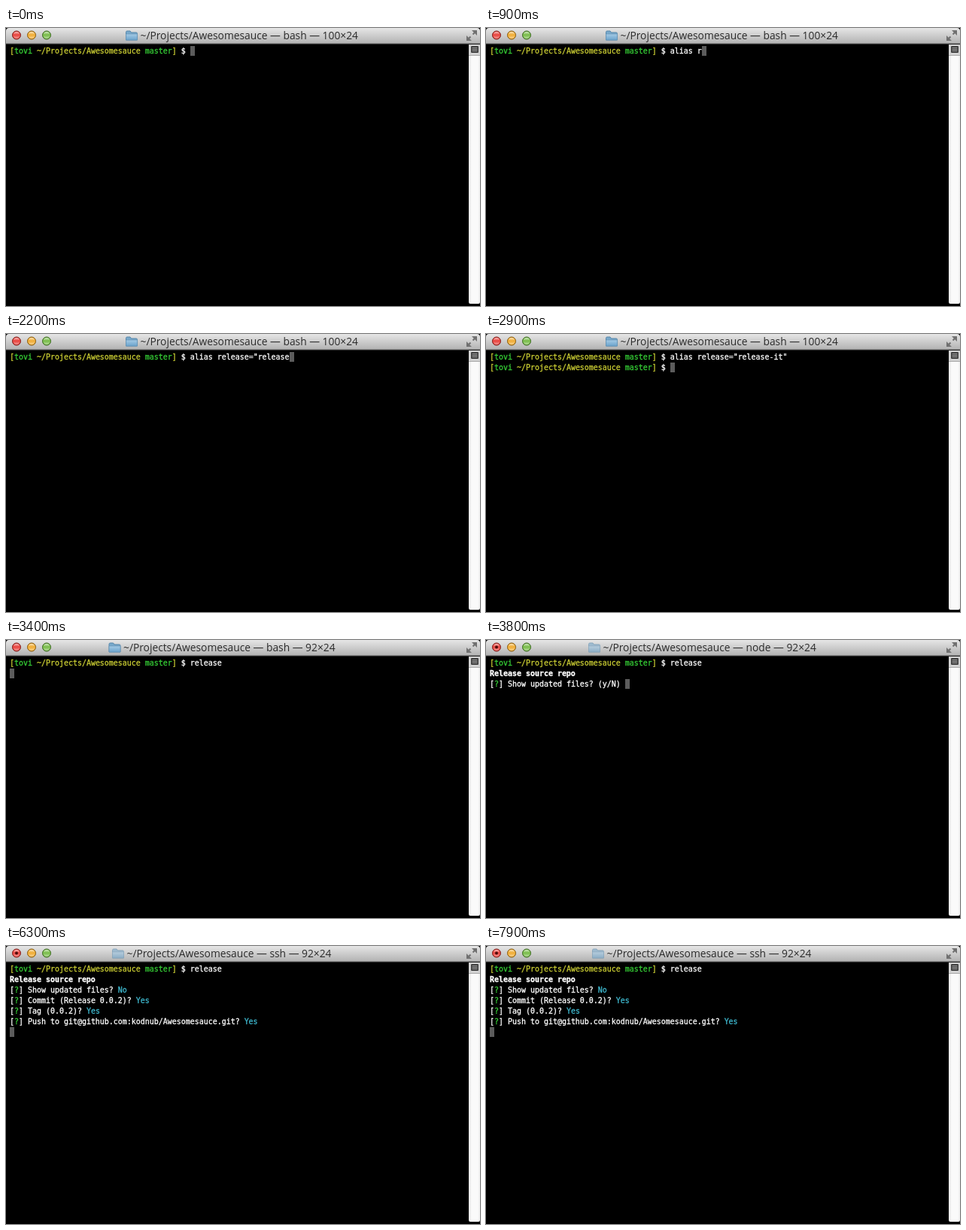
An HTML page that plays this animation: 630x370 px, repeating every 8 s.

```html
<!DOCTYPE html>
<html lang="en">
<head>
<meta charset="utf-8">
<title>Terminal release session</title>
<style>
  html, body { margin: 0; width: 100%; height: 100%; overflow: hidden; background: #000; }
  svg { position: absolute; left: 0; top: 0; }
  #title { font: 13.8px "Open Sans", "Noto Sans", sans-serif; fill: #2b2b2b; }
  #screen {
    position: absolute; left: 5px; top: 24px; margin: 0; color: #fff;
    font: 9.966px/14px "DejaVu Sans Mono", monospace; white-space: pre;
    -webkit-text-stroke: .3px;
  }
  #screen div { height: 14px; }
  #screen #cursor { position: absolute; width: 6px; height: 13px; background: #5c5c5c; }
  .y { color: #c9cc33; }
  .g { color: #35cc35; }
  .c { color: #3fb9cf; }
  .b { font-weight: bold; }
</style>
</head>
<body>
<svg width="630" height="370" viewBox="0 0 630 370">
  <defs>
    <linearGradient id="bar" x2="0" y2="1">
      <stop stop-color="#e6e6e6"/><stop offset="1" stop-color="#b1b1b1"/>
    </linearGradient>
    <linearGradient id="folderFill" x2="0" y2="1">
      <stop stop-color="#a5cbe6"/><stop offset="1" stop-color="#6ba3cc"/>
    </linearGradient>
    <linearGradient id="shine" x2="0" y2="1">
      <stop stop-color="#fff" stop-opacity=".7"/>
      <stop offset=".45" stop-color="#fff" stop-opacity="0"/>
      <stop offset="1" stop-color="#fff" stop-opacity=".45"/>
    </linearGradient>
    <linearGradient id="track">
      <stop stop-color="#e4e4e4"/><stop offset=".25" stop-color="#fafafa"/>
      <stop offset=".8" stop-color="#fafafa"/><stop offset="1" stop-color="#ececec"/>
    </linearGradient>
  </defs>
  <path d="M0 21V4Q0 0 4 0H626Q630 0 630 4V21Z" fill="url(#bar)"/>
  <path d="M0 21H630" stroke="#555"/>
  <g id="lights"></g>
  <circle id="busy" cx="14" cy="9.5" r="2" fill="#4d0a08"/>
  <g id="folder">
    <path d="M.5 13V2.5Q.5 1 2 1H6L7.5 3H14Q15.5 3 15.5 4.5V13Z" fill="#78a9cb" stroke="#5586aa"/>
    <path d="M.5 5H15.5V13H.5Z" fill="url(#folderFill)" stroke="#6594b6" stroke-width=".7"/>
  </g>
  <text id="title" y="14.5"></text>
  <g stroke="#707070" stroke-width="2" fill="#707070">
    <path d="M620.5 8.5L624 5M617.5 11.5L614 15"/>
    <path d="M619 3H626V10ZM612 10V17H619Z" stroke="none"/>
  </g>
  <path d="M615 22H630V365Q630 367 628 367H617Q615 367 615 365Z" fill="url(#track)"/>
  <path d="M615 22H630V36H615Z" fill="#d2d2d2"/>
  <path d="M615 36.5H630" stroke="#aaa"/>
  <rect x="618" y="24" width="10" height="9" rx="1" fill="#3c3c3c"/>
  <path d="M619.5 26.5H626.5M619.5 28.5H626.5M619.5 30.5H626.5" stroke="#a0a0a0"/>
</svg>
<div id="screen"><div id="rows"></div><div id="cursor"></div></div>
<script>
const $ = id => document.getElementById(id);
const DURATION = 8000, CELL = 6, ROW = 14;

$('lights').innerHTML = [['#e8403a', '#7c1d19'], ['#f0ab30', '#84590f'], ['#76bb46', '#3c6822']]
  .map(([fill, stroke], i) => {
    const cx = 14 + 20 * i;
    return `<circle cx="${cx}" cy="9.5" r="5.5" fill="${fill}" stroke="${stroke}"/>` +
      `<circle cx="${cx}" cy="9.5" r="4.6" fill="url(#shine)"/>`;
  }).join('');

// A line is a list of [style, text] runs.
const prompt = typed => [
  ['y', '['], ['g', 'tovi'], ['y', ' ~/Projects/Awesomesauce '],
  ['g', 'master'], ['y', ']'], ['', ' $ ' + typed]
];
const ask = (question, hint) => [['', '['], ['g', '?'], ['', `] ${question} ${hint}`]];
const answer = (question, reply) => [...ask(question, ''), ['c', reply]];

const alias = 'alias release="release-it"';
const files = 'Show updated files?', commit = 'Commit (Release 0.0.2)?', tag = 'Tag (0.0.2)?';
const push = 'Push to git@github.com:kodnub/Awesomesauce.git?';

const start = [prompt('release')];
const head = [...start, [['b', 'Release source repo']]];
const shown = [...head, answer(files, 'No')];
const committed = [...shown, answer(commit, 'Yes')];
const tagged = [...committed, answer(tag, 'Yes')];
const pushed = [...tagged, answer(push, 'Yes')];

const windows = {
  bash: { x: 178.5, text: 'bash — 100×24', busy: false },
  resized: { x: 156, text: 'bash — 92×24', busy: false },
  node: { x: 155.5, text: 'node — 92×24', busy: true },
  ssh: { x: 160.5, text: 'ssh — 92×24', busy: true }
};

// [start time, window, lines]; the cursor sits at the end of the last line.
const steps = [[0, 'bash', [prompt('')]]];
const type = (text, keys, before = []) => keys.forEach(([time, count]) =>
  steps.push([time, 'bash', [...before, prompt(text.slice(0, count))]]));

type(alias, Array.from({ length: 11 }, (_, i) => [500 + 100 * i, Math.round((i + 1) * 16 / 11)]));
type(alias, [[1600, 17], [1700, 18], [1800, 19], [1900, 20], [2000, 21], [2200, 22],
  [2400, 23], [2600, 24], [2700, 25], [2800, 26]]);
type('release', [[2900, 0], [3000, 2], [3100, 4], [3200, 6], [3300, 7]], [prompt(alias)]);
steps.push(
  [3400, 'resized', [...start, []]],
  [3500, 'node', [...head, []]],
  [3600, 'node', [...head, ask(files, '(y/N) ')]],
  [4300, 'node', [...head, ask(files, '(y/N) n')]],
  [4400, 'node', [...shown, ask(commit, '(Y/n) ')]],
  [4600, 'node', [...shown, ask(commit, '(Y/n) y')]],
  [4700, 'node', [...committed, ask(tag, '(Y/n) ')]],
  [4900, 'node', [...committed, ask(tag, '(Y/n) y')]],
  [5000, 'node', [...tagged, []]],
  [5200, 'node', [...tagged, ask(push, '(Y/n) ')]],
  [5500, 'node', [...tagged, ask(push, '(Y/n) y')]],
  [5600, 'ssh', [...pushed, []]]
);

function show([, name, lines]) {
  const win = windows[name];
  $('title').textContent = '~/Projects/Awesomesauce — ' + win.text;
  $('title').setAttribute('x', win.x);
  $('folder').setAttribute('transform', `translate(${win.x - 19.5} 3)`);
  $('folder').setAttribute('opacity', win.busy ? .6 : 1);
  $('busy').setAttribute('opacity', win.busy ? 1 : 0);
  $('rows').innerHTML = lines.map(runs => '<div>' +
    runs.map(([style, text]) => `<span class="${style}">${text}</span>`).join('') + '</div>').join('');
  const column = lines.at(-1).reduce((sum, [, text]) => sum + text.length, 0);
  $('cursor').style.left = column * CELL + 'px';
  $('cursor').style.top = (lines.length - 1) * ROW + 'px';
}

let origin, current;
function frame(now) {
  origin ??= now;
  const time = (now - origin) % DURATION;
  const step = steps.findLast(([at]) => at <= time);
  if (step !== current) show(current = step);
  requestAnimationFrame(frame);
}
show(current = steps[0]);
requestAnimationFrame(frame);
</script>
</body>
</html>
```
